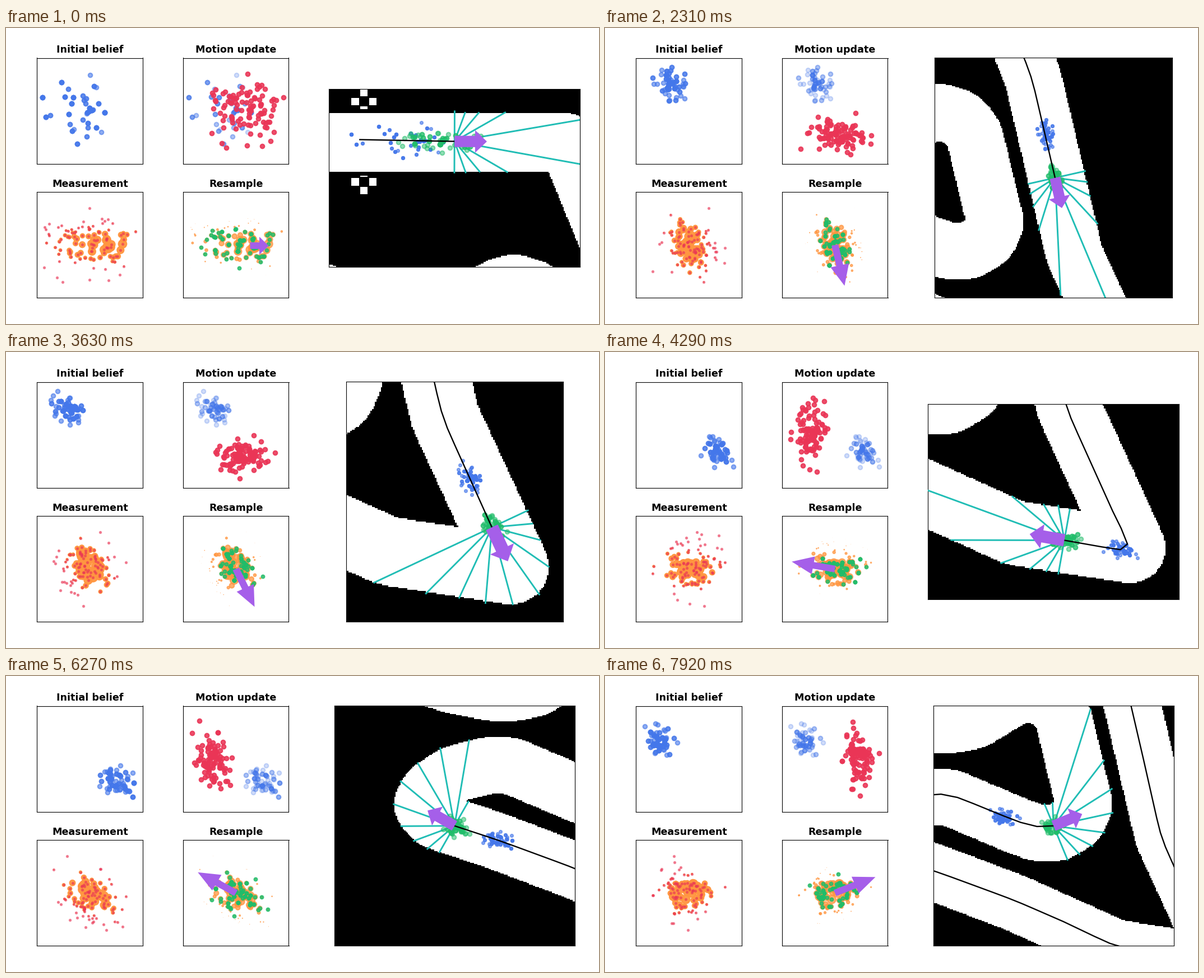
A matplotlib script that plays this animation: 1058x529 px, repeating every 8000 ms.

```python
import numpy as np
import matplotlib.pyplot as plt
from matplotlib.animation import FuncAnimation

STAGE_W, STAGE_H, DPI = 1058, 529, 100
LOOP, TICK, STEP = 8000, 80, 330
STEPS = 25
BLUE, RED, ORANGE = "#4477ea", "#ea3556", "#ff9640"
GREEN, PURPLE, CYAN = "#20bd6a", "#a55fe9", "#20bdb5"

# World units: one map cell each, y pointing down
LEFT, RIGHT, BOTTOM = -245, 241, 416
ROAD_RADIUS, VIEW, MARGIN = 23.7, 100, 6.5
PARTICLES = 100

# Corners of the road's centre line
ROAD = [(-215, 42.3), (91, 42.3), (125, 126), (160, 275), (209, 381),
        (121, 367.5), (36, 329.5), (-26, 306), (-82, 287), (-92, 275),
        (-85, 262), (-65, 249), (-34, 241.3), (-17, 242), (37, 265),
        (55, 271.5), (72, 271.5), (88, 262), (94.5, 248), (91, 235),
        (76.5, 174), (66, 161), (48, 155), (34, 159), (3, 178),
        (-17, 181.5), (-34, 181), (-65, 175), (-108, 162), (-215, 115)]
# Where the robot is at a few steps
STOPS = {-2: (-75.4, 40.4), 0: (0, 41.8), 3: (100.8, 68.3),
         7: (143.6, 210.3), 11: (192.3, 351), 15: (77, 345.2),
         19: (-64, 292), 24: (68.7, 265.4), 25: (93, 247)}


def walk(corners):
    """Points one unit apart along a polyline."""
    p = np.array(corners, float)
    s = np.r_[0, np.cumsum(np.hypot(*np.diff(p, axis=0).T))]
    at = np.arange(0, s[-1])
    return np.c_[np.interp(at, s, p[:, 0]), np.interp(at, s, p[:, 1])]


def smooth(points, n):
    padded = np.pad(points, ((n // 2, n // 2), (0, 0)), mode="edge")
    return np.c_[[np.convolve(c, np.ones(n) / n, "valid")
                  for c in padded.T]].T


def build_map(line):
    free = np.zeros((BOTTOM, RIGHT - LEFT), bool)
    # Two crosses of white squares beside the road
    for cy in (10, 74):
        for dx, dy in ((0, -7), (0, 7), (-7, 0), (7, 0)):
            row, col = max(cy + dy - 3, 0), -72 + dx - 3 - LEFT
            free[row:row + 6, col:col + 6] = True
    free[16:69] = False

    reach = int(ROAD_RADIUS) + 2
    for x, y in line:
        row, col = int(y) - reach, int(x - LEFT) - reach
        gy, gx = np.ogrid[row:row + 2 * reach, col:col + 2 * reach]
        near = np.hypot(gx + .5 + LEFT - x, gy + .5 - y) < ROAD_RADIUS
        free[row:row + 2 * reach, col:col + 2 * reach] |= near
    return free


def plan_drive(line):
    """Function from step number to place, along the line via the stops."""
    path = smooth(line, 25)
    times = np.array(list(STOPS))
    stops = np.array(list(STOPS.values()))
    index = [np.argmin(np.hypot(*(path - p).T)) for p in stops]
    drift = stops - path[index]

    def place(t):
        s = np.interp(t, times, index)
        return np.stack([np.interp(s, np.arange(len(path)), path[:, c])
                         + np.interp(t, times, drift[:, c])
                         for c in (0, 1)], axis=-1)
    return place


def fit(points, center, size):
    lo, hi = points.min(0), points.max(0)
    return (points - (lo + hi) / 2) / (hi - lo) * size + center


def cast_rays(pose, angle, rng):
    ends = []
    for a in angle + np.radians(np.arange(-90, 91, 20)):
        ray = np.array([np.cos(a), np.sin(a)])
        for dist in np.arange(2, 150, .5):
            x, y = pose + ray * dist
            inside = LEFT <= x < RIGHT and 0 <= y < BOTTOM
            if not inside or not free[int(y), int(x - LEFT)]:
                break
        ends.append(pose + ray * (dist + rng.uniform(-.3, 1)))
    return ends


def simulate():
    """Run the particle filter once and keep every step."""
    rng = np.random.default_rng(11)
    picks = rng.normal(size=(36, 2))[rng.integers(0, 36, PARTICLES)]
    steps = []
    for k in range(STEPS):
        pose, before, ahead = place(np.array([k, k - 1, k + .6]))
        angle = np.arctan2(*(ahead - pose)[::-1])
        forward = np.array([np.cos(angle), np.sin(angle)])
        side = np.array([-forward[1], forward[0]])

        # The cloud starts stretched along the road and soon tightens
        wide = np.exp(-k)
        course = (pose - before) / np.hypot(*(pose - before))
        b_size = np.hypot(course * (25 + 48 * wide),
                          course[::-1] * (12 + 16 * wide))
        r_size = np.array([28, 30]) + forward * 56 * wide
        belief = fit(picks, before - course * 8 * wide, b_size)
        noise = rng.normal(size=(PARTICLES, 2)) * r_size / 5.5
        moved = fit(belief - before + noise, pose - course * 13 * wide, r_size)

        along = (moved - pose) @ forward / (6 + 16 * wide)
        across = (moved - pose) @ side / 3
        weight = np.exp(-.5 * (along ** 2 + across ** 2))
        weight *= rng.uniform(.4, 1, PARTICLES)
        picks = moved[rng.choice(PARTICLES, PARTICLES,
                                 p=weight / weight.sum())]
        steps.append(dict(pose=pose, forward=forward, belief=belief,
                          moved=moved, weight=weight / weight.max(),
                          picks=picks, rays=cast_rays(pose, angle, rng)))
    return steps


line = smooth(walk(ROAD), 11)
free = build_map(line)
place = plan_drive(line)
steps = simulate()

fig = plt.figure(figsize=(STAGE_W / DPI, STAGE_H / DPI), dpi=DPI,
                 facecolor="white")


def box(x, y, w, h):
    return [x / STAGE_W, 1 - (y + h) / STAGE_H, w / STAGE_W, h / STAGE_H]


def add_axes(x, y, w, h):
    ax = fig.add_axes(box(x, y, w, h))
    ax.set_xticks([])
    ax.set_yticks([])
    ax.set_autoscale_on(False)
    return ax


def add_panel(x, y, title):
    fig.text((x + 94.5) / STAGE_W, 1 - (y - 9) / STAGE_H, title,
             ha="center", va="baseline", family="DejaVu Sans",
             weight="bold", size=12.6)
    return add_axes(x, y, 188.6, 189)


initial = add_panel(55.4, 53.5, "Initial belief")
motion = add_panel(315.9, 53.5, "Motion update")
measure = add_panel(55.4, 293.3, "Measurement")
resample = add_panel(315.9, 293.3, "Resample")
world = add_axes(576, 53, 448, 429)
world.imshow(free, cmap="gray", vmin=0, vmax=1, interpolation="nearest",
             extent=(LEFT, RIGHT, BOTTOM, 0), aspect="auto", zorder=0)
artists = []


def dots(ax, points, size, color, alpha, z, edge=1.5):
    artists.append(ax.scatter(*points.T, s=size, c=color, alpha=alpha,
                              linewidths=edge, zorder=z))


def weighted(ax, s, alpha):
    size = 150 * s["weight"]
    dots(ax, s["moved"], size, ORANGE, alpha, 2,
         np.minimum(1.5, .3 * np.sqrt(size)))


def arrow(ax, s, length, width, head, head_length):
    artists.append(ax.arrow(*s["pose"], *(length * s["forward"]),
                            width=width, head_width=head,
                            head_length=head_length, lw=0, color=PURPLE,
                            length_includes_head=True, zorder=6))


def frame_points(axes, points):
    lo, hi = points.min(0) - MARGIN, points.max(0) + MARGIN
    for ax in axes:
        ax.set_xlim(lo[0], hi[0])
        ax.set_ylim(hi[1], lo[1])


def frame_world(pose):
    x, y = pose
    x0, x1 = x - VIEW, min(x + VIEW, RIGHT)
    y0, y1 = max(y - VIEW, 0), min(y + VIEW, BOTTOM)
    scale = min(448 / (x1 - x0), 429 / (y1 - y0))
    w, h = scale * (x1 - x0), scale * (y1 - y0)
    world.set_position(box(800.2 - w / 2, 267.8 - h / 2, w, h))
    world.set_xlim(x0, x1)
    world.set_ylim(y1, y0)


def draw(i):
    k = min((i * TICK + TICK - 1) // STEP, STEPS - 1)
    s = steps[k]
    while artists:
        artists.pop().remove()

    dots(initial, s["belief"], 30, BLUE, .6, 2)
    dots(motion, s["belief"], 30, BLUE, .25, 2)
    dots(motion, s["moved"], 30, RED, .88, 3)
    weighted(measure, s, .95)
    dots(measure, s["moved"], 6, RED, .5, 3)
    weighted(resample, s, .75)
    dots(resample, s["picks"], 18, GREEN, .8, 3)
    arrow(resample, s, 17, 2.7, 7.3, 8.5)

    dots(world, s["belief"], 14, BLUE, .6, 2)
    for end in s["rays"]:
        artists.extend(world.plot(*zip(s["pose"], end), color=CYAN, lw=2.1,
                                  zorder=3))
    dots(world, s["picks"], 30, GREEN, .5, 4)
    trail = place(np.arange(-6, 3 * k + 1) / 3)
    artists.extend(world.plot(*trail.T, color="black", lw=1.7, zorder=5))
    arrow(world, s, 25.8, 9, 18, 9.4)

    frame_points((initial, motion), np.vstack([s["belief"], s["moved"]]))
    frame_points((measure, resample), s["moved"])
    frame_world(s["pose"])
    return artists


anim = FuncAnimation(fig, draw, frames=LOOP // TICK, interval=TICK,
                     repeat=True, repeat_delay=0, blit=False)
plt.show()
```
